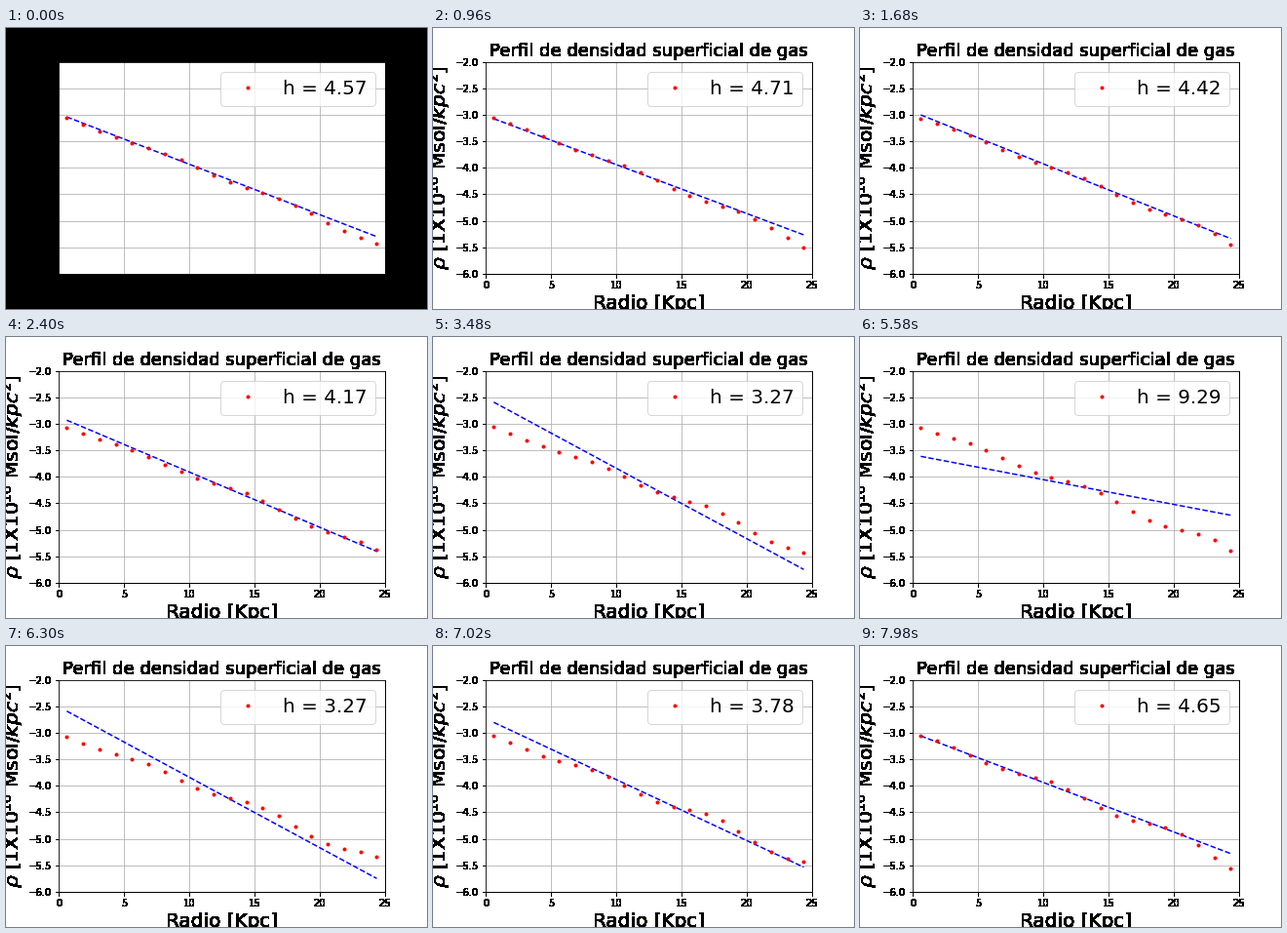
Recreate the animation shown at these times as a matplotlib script. Size 432 by 288 pixels, loop 8 s.

```python
import numpy as np
import matplotlib.pyplot as plt
from matplotlib.animation import FuncAnimation

plt.rcParams["font.family"] = "DejaVu Sans"

LOOP, TICK, HOLD = 8000, 20, 60
TOP, UNIT = 34.56, 54.36          # pixel row of y = -2, pixels per y unit

ring = np.arange(20)
radius = 1.25 * (ring + 0.5)

# Scale length of the fit (kpc) at its turning points (s).
h_keys = {0: 4.57, 0.96: 4.71, 2.4: 4.17, 4.56: 2.69, 5.04: 4.4,
          5.4: 10.3, 5.58: 9.29, 6.42: 2.95, 7.02: 3.78, 7.98: 4.65}
slopes = np.log10(np.e) / np.array(list(h_keys.values()))


def to_y(row):
    return -2 - (row - TOP) / UNIT


def density(t):
    """Falling profile with a wave that runs outwards and grows."""
    crest = 2.5 + 2.08 * t
    size = (1 + ring / 4) * (0.5 + t / 12)
    wave = size * np.cos(2 * np.pi * (ring - crest) / 7.3)
    return to_y(92.5 + 6.2 * ring + 0.0016 * ring**3 + wave)


def fit(t):
    slope = np.interp(t, list(h_keys), slopes)
    return to_y(152.5) - slope * (radius - 12.5), np.log10(np.e) / slope


fig = plt.figure(figsize=(6, 4), dpi=72, facecolor=(1, 1, 1, 0))
ax = fig.add_axes([0.125, 0.125, 0.775, 0.755])
ax.set(xlim=(0, 25), ylim=(-6, -2))
ax.grid(True)
ax.set_title("Perfil de densidad superficial de gas", fontsize=18)
ax.set_xlabel("Radio [Kpc]", fontsize=20)
ax.set_ylabel(r"$\rho$ [1X10$^{10}$ Msol/$kpc^2$]", fontsize=20, labelpad=3)

# Flatten the see-through chart: every touched pixel becomes opaque,
# the empty surround is black at first and white afterwards.
fig.canvas.draw()
chart = np.array(fig.canvas.buffer_rgba())
empty = chart[..., 3] == 0
chart[..., 3] = 255


def backdrop(level):
    img = chart.copy()
    img[empty, :3] = level
    return img


dark, light = backdrop(0), backdrop(255)
fig.set_facecolor("white")
ax.set_axis_off()
back = fig.figimage(dark, zorder=-1)

line, = ax.plot(radius, radius, "b--", lw=1.5)
dots, = ax.plot(radius, radius, "r.", ms=6, label="h = 4.57")
legend = ax.legend(loc="upper right", fontsize=20)
label = legend.get_texts()[0]


def draw(i):
    ms = i * TICK // HOLD * HOLD
    t = ms / 1000
    y, h = fit(t)
    back.set_data(light if ms else dark)
    line.set_ydata(y)
    dots.set_ydata(density(t))
    label.set_text(f"h = {h:.2f}")
    return back, line, dots, legend


anim = FuncAnimation(fig, draw, frames=LOOP // TICK, interval=TICK,
                     init_func=lambda: draw(0), repeat=True, repeat_delay=0)
plt.show()
```
